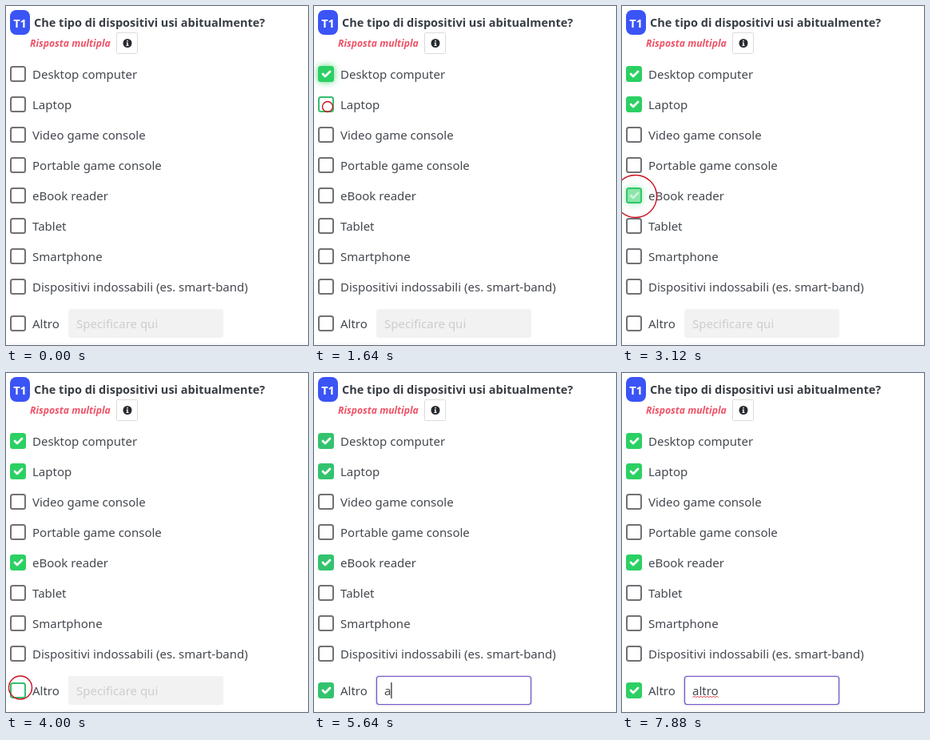
Recreate the animation shown at these times as an HTML page. Size 378 by 424 pixels, loop 7920 ms.

```html
<!DOCTYPE html>
<html lang="it">
<head>
<meta charset="utf-8">
<title>Dispositivi</title>
<style>
html, body { margin: 0; width: 100%; height: 100%; overflow: hidden; background: #fff; }
svg { display: block; width: 378px; height: 424px; }
text { font: 15px "Noto Sans", sans-serif; fill: #43484e; white-space: pre; }
.title { font-size: 14.5px; font-weight: 600; fill: #383d43; }
.badge { font-size: 14.5px; font-weight: 600; fill: #fff; text-anchor: middle; }
.note { font-size: 12.15px; font-weight: 600; font-style: italic; fill: #ee5266; }
.hint { fill: #cdcdcd; }
</style>
</head>
<body>
<svg id="stage" viewBox="0 0 378 424">
  <rect y="421" width="378" height="3" fill="#fafafa"/>
  <rect x="5" y="5" width="25" height="31" rx="8" fill="#3b54f5"/>
  <text class="badge" x="17.5" y="27">T1</text>
  <text class="title" x="35" y="26">Che tipo di dispositivi usi abitualmente?</text>
  <text class="note" x="30" y="51">Risposta multipla</text>
  <rect x="138.5" y="33.5" width="26" height="26" rx="1" fill="#fff" stroke="#dcdcdc"/>
  <circle cx="152" cy="46.5" r="5.5" fill="#26292d"/>
  <path d="M152 42.7v1.8M150.8 46.1h1.2v3M150.5 49.4h3" stroke="#fff" stroke-width="1.4" fill="none"/>
  <rect id="field" x="78.5" y="379.5" width="193" height="35" rx="3" stroke-width="1.2"/>
  <text id="hint" class="hint" x="88" y="403">Specificare qui</text>
  <text id="typed" x="88" y="403"></text>
  <path id="squiggle" fill="none" stroke="#e0343c"/>
  <path id="caret" stroke="#222" stroke-width="1.2"/>
  <g id="rows"></g>
  <circle id="ring" fill="none" stroke="#c9121f" stroke-width="1.4"/>
</svg>
<script>
const LOOP = 7920, STEP = 40;
const GREY = [112, 112, 117], GREEN = [43, 208, 99], HOVER = [52, 190, 110];
const PURPLE = [121, 82, 205], DISABLED = [242, 242, 242], WHITE = [255, 255, 255], FOCUS = [116, 90, 196];

// hover: [from, to] span; press: mouse-down time; blur: when the focus glow goes
const options = [
  { label: 'Desktop computer', y: 85, hover: [360, 1280], press: 840, blur: 1720 },
  { label: 'Laptop', y: 123, hover: [1280, 2160], press: 1640, blur: 2960 },
  { label: 'Video game console', y: 161, hover: [2160, 2240] },
  { label: 'Portable game console', y: 199, hover: [2240, 2320] },
  { label: 'eBook reader', y: 237, hover: [2520, 3360], press: 2920, blur: 3840 },
  { label: 'Tablet', y: 275, hover: [3360, 3400] },
  { label: 'Smartphone', y: 313, hover: [3400, 3440] },
  { label: 'Dispositivi indossabili (es. smart-band)', y: 351, hover: [3440, 3480] },
  { label: 'Altro', y: 397, hover: [3480, 4520], press: 3920, blur: 4600 }
];
const clicks = [[840, 17, 86], [1640, 17, 126], [2920, 17, 238], [3920, 18, 393.5], [4600, 193.5, 393.5]];
const keys = [[5520, 'a'], [5720, 'l'], [5840, 't'], [6040, 'r'], [6120, 'o']];
const ENABLE = 4080, FOCUSED = 4640, BLINK = 530, CHECK_DELAY = 120, RING_TIME = 320;

const $ = id => document.getElementById(id);
const set = (el, attrs) => { for (const k in attrs) el.setAttribute(k, attrs[k]); };
const add = (parent, tag, attrs) => {
  const el = document.createElementNS('http://www.w3.org/2000/svg', tag);
  set(el, attrs);
  return parent.appendChild(el);
};
const ease = (t, start, time = 150) => {
  const k = Math.max(0, Math.min(1, (t - start) / time));
  return k * k * (3 - 2 * k);
};
const mix = (a, b, k) => a.map((v, i) => v + (b[i] - v) * k);
const rgb = (c, alpha = 1) => `rgba(${c.map(Math.round)},${alpha})`;
const show = (el, on) => { el.style.display = on ? '' : 'none'; };

for (const o of options) {
  add($('rows'), 'text', { x: 33, y: o.y + 6 }).textContent = o.label;
  o.box = add($('rows'), 'rect', { x: 6, y: o.y - 9, width: 18, height: 18, rx: 2.5, 'stroke-width': 2 });
  o.tick = add($('rows'), 'path', {
    d: `M11 ${o.y}l3 3 6-6`, fill: 'none', stroke: '#fff', 'stroke-width': 2.8,
    'stroke-linecap': 'round', 'stroke-linejoin': 'round'
  });
}
set($('squiggle'), { d: 'M88.5 406' + 'l2-2 2 2'.repeat(8) });

function drawOption(o, t, accent) {
  const checked = o.press ? ease(t, o.press + CHECK_DELAY) : 0;
  const hovered = t >= o.hover[0] && t < o.hover[1];
  const glow = checked * (1 - ease(t, o.blur ?? 0));
  set(o.box, {
    fill: rgb(mix(WHITE, accent, checked)),
    stroke: rgb(mix(hovered ? HOVER : GREY, accent, checked))
  });
  o.box.style.filter = glow ? `drop-shadow(0 0 4px ${rgb(accent, glow * .8)})` : 'none';
  set(o.tick, { opacity: checked });
}

function drawField(t) {
  const focus = ease(t, FOCUSED, 80);
  const background = mix(DISABLED, WHITE, ease(t, ENABLE));
  set($('field'), { fill: rgb(background), stroke: rgb(mix(background, FOCUS, focus)) });
  $('field').style.filter = focus ? `drop-shadow(0 0 1px ${rgb(FOCUS, focus * .6)})` : 'none';

  const pressed = keys.filter(([at]) => t >= at);
  $('typed').textContent = pressed.map(([, key]) => key).join('');
  show($('hint'), !pressed.length);
  show($('squiggle'), t >= 7240);

  const lastInput = pressed.length ? pressed.at(-1)[0] : FOCUSED - 20;
  const x = 88.5 + (pressed.length ? $('typed').getComputedTextLength() : 0);
  set($('caret'), { d: `M${x} 387v20` });
  show($('caret'), t >= FOCUSED && Math.floor((t - lastInput) / BLINK) % 2 === 0);
}

function drawRing(t) {
  const click = clicks.find(([at]) => t >= at && t < at + RING_TIME);
  show($('ring'), click);
  if (click) set($('ring'), { cx: click[1], cy: click[2], r: 6.5 + (t - click[0]) / 10 });
}

function draw(t) {
  // Accent is purple while "Altro" is ticked but still empty
  const accent = mix(GREEN, PURPLE, ease(t, ENABLE) - ease(t, keys[0][0]));
  options.forEach(o => drawOption(o, t, accent));
  drawField(t);
  drawRing(t);
}

const start = performance.now();
function tick() {
  const t = (performance.now() - start) % LOOP;
  draw(Math.floor(t / STEP) * STEP);
  requestAnimationFrame(tick);
}
tick();
</script>
</body>
</html>
```
